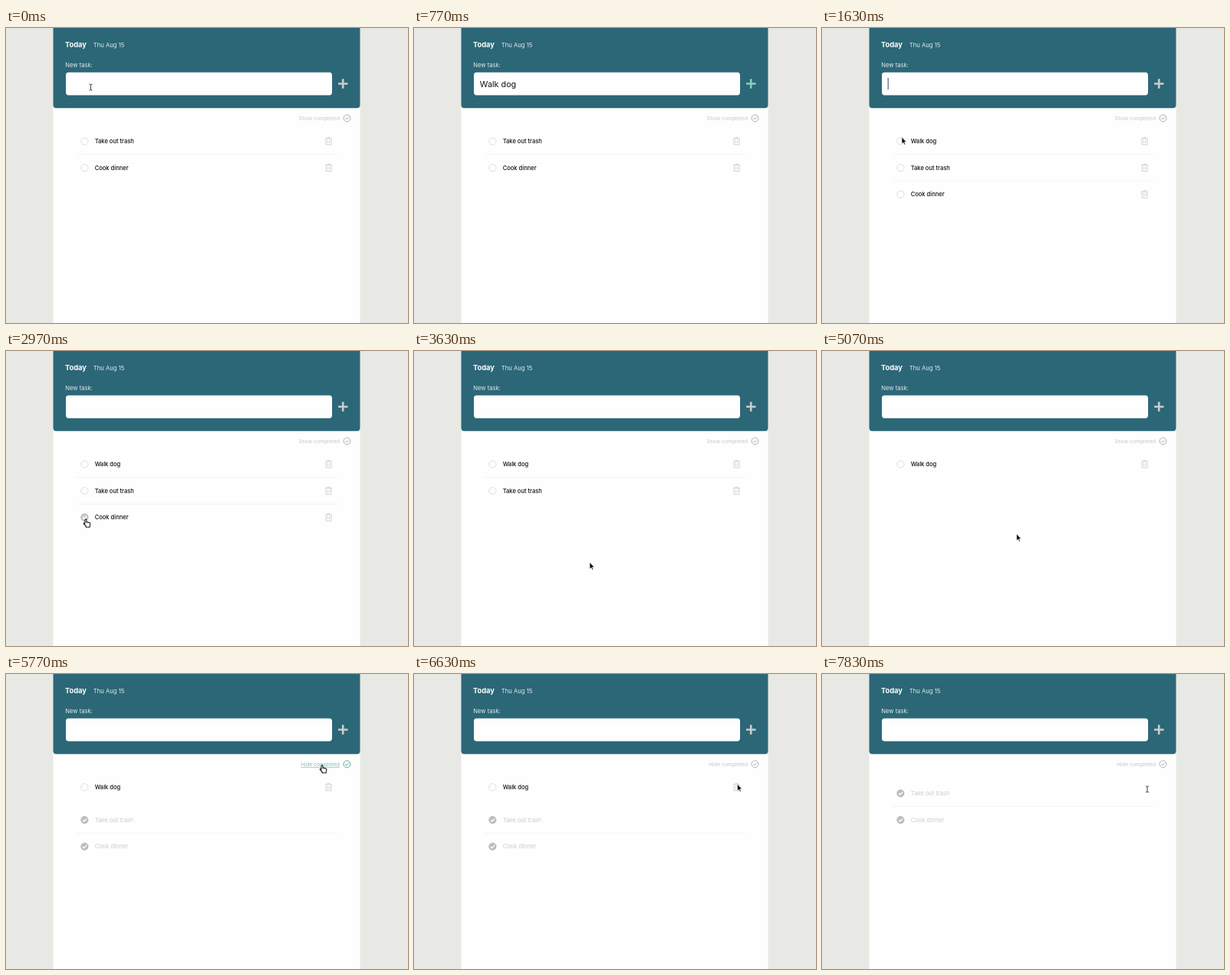
An HTML page for the animation above (7930 ms loop, 524 by 384 pixels).

```html
<!DOCTYPE html>
<html lang="en">
<head>
<meta charset="utf-8">
<title>Task list</title>
<style>
html, body { margin: 0; width: 100%; height: 100%; overflow: hidden; background: #e8e8e4; }
svg { display: block; width: 524px; height: 384px; font-family: Inter, Roboto, sans-serif; }
.row text { font-size: 7.55px; font-weight: 500; fill: #111114; }
.row .ring { fill: #fefefe; stroke: #dedede; }
.row .tick { fill: none; stroke: #fefefe; stroke-width: 1.4; visibility: hidden; }
.row .bin { fill: none; stroke: #d2d2d2; }
.row .rule { stroke: #f3f3f3; }
.row.hover .ring { stroke: #a8a8a4; fill: #cfcfcb; }
.row.hover .tick, .row.done .tick { visibility: visible; }
.row.done .ring { fill: #bcbcbc; stroke: #bcbcbc; }
.row.done text { fill: #cbcbcb; font-weight: 400; }
.row.done .bin { display: none; }
.row.trash .bin { stroke: #989898; }
#link text { font-size: 6.8px; fill: #c6c6c6; }
#link path { fill: none; stroke: #b0b0b0; }
#link.hover text { fill: #7fc0b4; text-decoration: underline; }
#link.hover path { stroke: #52ab98; }
</style>
</head>
<body>
<svg viewBox="0 0 524 384">
  <rect width="524" height="384" fill="#e8e8e4"/>
  <rect x="61.5" width="400" height="384" fill="#fefefe"/>
  <path d="M61.5 0H461.5V100q0 4.2-4 4.2H65.5q-4 0-4-4.2Z" fill="#2b6777"/>
  <text x="77" y="25.3" font-size="9.3" font-weight="700" fill="#fefefe">Today</text>
  <text x="113.7" y="24.7" font-size="7.7" fill="#e2ebee">Thu Aug 15</text>
  <text x="77.3" y="51" font-size="7.6" fill="#e2ebee">New task:</text>
  <rect x="78" y="57.8" width="347" height="29.6" rx="3.6" fill="#fefefe"/>
  <text id="entry" x="85.8" y="77" font-size="10.8" fill="#111114"></text>
  <rect id="caret" y="65" width="1.2" height="15" fill="#5d6a6c"/>
  <path id="plus" d="M433 72.5h12.5M439.2 66.3v12.4" stroke-width="2.6"/>
  <g id="link">
    <text x="435" y="120" text-anchor="end"></text>
    <path d="M440 117.3a4.5 4.5 0 1 0 9 0a4.5 4.5 0 1 0-9 0M442.3 117.4l1.7 1.6 3-3.4"/>
  </g>
  <g id="list"></g>
  <g id="arrow"><path d="M0 0v8.8l2-1.8 1.4 3 1.4-.6-1.4-2.9h2.7Z" fill="#111114" stroke="#fefefe" stroke-width=".6"/></g>
  <g id="hand"><path d="M-1 .8q1-1.6 2 0v3.2q1.4-.8 1.9.3q1.3-.5 1.7.5q1.4 0 1.3 1.4l-.7 2.6v1.5H.2v-1.3L-2.6 6q-.5-1.6 1-1.1l.6.7Z" fill="#fefefe" stroke="#1c1c20" stroke-width="1.1" stroke-linejoin="round"/></g>
  <g id="beam"><path d="M-2-4q2 0 2 1.2q0-1.2 2-1.2M0-3v6M-2 4q2 0 2-1.2q0 1.2 2 1.2" fill="none" stroke="#333336" stroke-width=".9"/></g>
</svg>
<script>
const LOOP = 7930, STEP = 34.6, TOP = 147.4, NEW_TASK = "Walk dog";
const ADD = 950, TYPE = 150, CHAR = 70;
const $ = id => document.getElementById(id);
const within = (t, a, b) => t >= a && t < b;
const show = (el, on) => el.setAttribute("display", on ? "inline" : "none");

const tasks = [
  { name: NEW_TASK, from: ADD, done: LOOP, gone: 7830, bin: [6650, 7830] },
  { name: "Take out trash", from: 0, done: 4790, gone: LOOP, hover: [4250, 4790] },
  { name: "Cook dinner", from: 0, done: 3120, gone: LOOP, hover: [2850, 3120] }
];

// time, x, y of the pointer's hot spot
const path = [
  [0, 110.5, 77], [1470, 110.5, 77], [1630, 104, 142], [1900, 105, 209],
  [2430, 105, 209], [2680, 109, 238], [2940, 104, 219], [3300, 104, 219],
  [3490, 190, 290], [3630, 229, 275], [3800, 229, 275], [4370, 100, 185],
  [4770, 100, 185], [4960, 210, 271], [5330, 412, 118.5], [6230, 412, 118.5],
  [6800, 424, 150], [LOOP, 424, 150]
];
const shapes = [
  [0, "beam"], [TYPE, ""], [1470, "beam"], [1520, "arrow"], [2850, "hand"],
  [3120, "arrow"], [4250, "hand"], [4790, "arrow"], [5250, "hand"],
  [6300, "arrow"], [6650, "hand"], [7830, "beam"]
];

for (const task of tasks) {
  $("list").insertAdjacentHTML("beforeend", `<g class="row">
    <circle class="ring" cx="102.4" r="4.6"/>
    <path class="tick" d="M100 .1l1.8 1.8 3.2-3.6"/>
    <text x="115.7" y="2.7">${task.name}</text>
    <path class="bin" d="M416-3.5h9M419-3.5v-1.5h3v1.5M417-3.5v8h7v-8M419.3-1.5v4M421.7-1.5v4"/>
    <path class="rule" d="M92 17.1H432"/></g>`);
  task.el = $("list").lastElementChild;
}
const label = document.querySelector("#link text");

function pointer(t) {
  const i = Math.max(1, path.findIndex(p => p[0] > t));
  const [t0, x0, y0] = path[i - 1], [t1, x1, y1] = path[i];
  const u = (t - t0) / (t1 - t0), e = u * u * (3 - 2 * u);
  return [x0 + (x1 - x0) * e, y0 + (y1 - y0) * e];
}

function place(task, y, state, last) {
  show(task.el, true);
  task.el.setAttribute("class", "row " + state);
  task.el.setAttribute("transform", `translate(0 ${y})`);
  show(task.el.querySelector(".rule"), !last);
}

function draw(t) {
  const typed = t < ADD ? Math.max(0, Math.floor((t - TYPE) / CHAR) + 1) : 0;
  const entry = $("entry");
  entry.textContent = NEW_TASK.slice(0, typed);
  show($("caret"), within(t, 90, 700) || within(t, 830, 2270));
  $("caret").setAttribute("x", 85.6 + (typed ? entry.getComputedTextLength() + .6 : 0));
  $("plus").setAttribute("stroke", typed ? "#88cfc0" : "#cccccc");

  const open = t >= 5770;
  label.textContent = (open ? "Hide" : "Show") + " completed";
  $("link").setAttribute("class", within(t, 5250, 6300) ? "hover" : "");

  const todo = tasks.filter(k => within(t, k.from, Math.min(k.done, k.gone)));
  const done = open ? tasks.filter(k => within(t, k.done, k.gone)) : [];
  tasks.forEach(k => show(k.el, false));
  todo.forEach((k, i) => {
    const state = k.hover && within(t, ...k.hover) ? "hover"
      : k.bin && within(t, ...k.bin) ? "trash" : "";
    place(k, TOP + i * STEP, state, i === todo.length - 1);
  });
  done.forEach((k, i) =>
    place(k, TOP + 8 + (todo.length + i) * STEP, "done", i === done.length - 1));

  const shape = shapes.filter(s => s[0] <= t).pop()[1];
  const [x, y] = pointer(t);
  for (const id of ["arrow", "hand", "beam"]) {
    show($(id), id === shape);
    $(id).setAttribute("transform", `translate(${x} ${y})`);
  }
}

const start = performance.now();
function tick(now) {
  draw(Math.max(0, now - start) % LOOP);
  requestAnimationFrame(tick);
}
draw(0);
requestAnimationFrame(tick);
</script>
</body>
</html>
```
